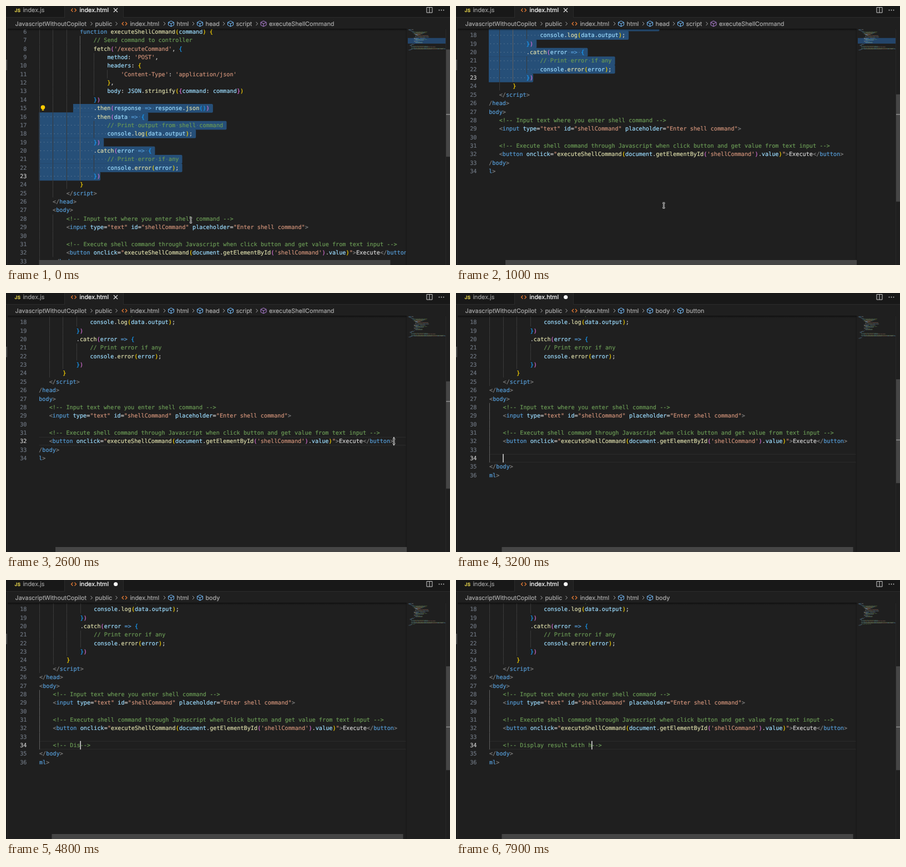
An HTML page with a canvas that plays this animation: 800x468 px, repeating every 8 s.

```html
<!DOCTYPE html>
<html lang="en">
<head>
<meta charset="utf-8">
<style>
  html, body { margin: 0; width: 100%; height: 100%; overflow: hidden; background: #1f1f1f; }
  canvas { display: block; }
</style>
</head>
<body>
<canvas id="stage" width="800" height="468"></canvas>
<script>
const ctx = document.getElementById('stage').getContext('2d');
const LOOP = 8000, LINE = 15.36, CHAR = 6.145, LEFT = 59.5, TOP = 42, VIEW = 425, RIGHT = 722;
const MONO = '10.2px "DejaVu Sans Mono", monospace';
const UI = '10.8px Inter, sans-serif';
const CLICK = 2600, REFRESH = 2700, ENTER = [2900, 3000];
const COLOR = {
  bg: '#1f1f1f', bar: '#181818', border: '#2b2b2b', text: '#d4d4d4', keyword: '#569cd6',
  call: '#dcdcaa', name: '#9cdcfe', string: '#ce9178', comment: '#6a9955', punct: '#808080',
  error: '#f44747', select: '#264f78', slider: '#454545', orange: '#e37933'
};
const BRACKETS = ['#ffd700', '#da70d6', '#179fff'];

const SOURCE = `<!DOCTYPE html>
<html>
    <head>
        <script>
            // Execute shell command through Javascript
            function executeShellCommand(command) {
                // Send command to controller
                fetch('/executeCommand', {
                    method: 'POST',
                    headers: {
                        'Content-Type': 'application/json'
                    },
                    body: JSON.stringify({command: command})
                })
                .then(response => response.json())
                .then(data => {
                    // Print output from shell command
                    console.log(data.output);
                })
                .catch(error => {
                    // Print error if any
                    console.error(error);
                })
            }
        <\/script>
    </head>
    <body>
        <!-- Input text where you enter shell command -->
        <input type="text" id="shellCommand" placeholder="Enter shell command">

        <!-- Execute shell command through Javascript when click button and get value from text input -->
        <button onclick="executeShellCommand(document.getElementById('shellCommand').value)">Execute</button>
    </body>
</html>`.split('\n');

// Typing: one time per character of DRAFT
const DRAFT = '<!-- Display result with h';
const KEY_TIMES = [3400, 3800, 4000, 4100, 4300,
  ...Array.from({ length: 14 }, (_, i) => 4600 + 100 * i),
  6100, 6400, 6500, 6600, 6800, 7300, 7900];
const AUTO_CLOSE = 4200;

// Keyframes: [time, ...values]
const SCROLL = [[0, 80.1, 0], [100, 128, 0], [200, 222, 0], [300, 284, 0], [400, 286, 3], [600, 266, 20], [800, 258, 31]];
const MOUSE = [[900, 333, 387], [1200, 457, 307], [1800, 651, 264], [2000, 680, 265], [2200, 680, 265], [2500, 699, 268]];

function sample(keys, t) {
  if (t <= keys[0][0]) return keys[0].slice(1);
  const next = keys.findIndex(k => k[0] > t);
  if (next < 0) return keys[keys.length - 1].slice(1);
  const a = keys[next - 1], b = keys[next], u = (t - a[0]) / (b[0] - a[0]);
  return a.slice(1).map((v, i) => v + (b[i + 1] - v) * u);
}

function rect(x, y, w, h, color) { ctx.fillStyle = color; ctx.fillRect(x, y, w, h); }

// A hairline stroke gives the text a slightly heavier weight
function text(str, x, y, color, font = UI, align = 'left') {
  ctx.font = font;
  ctx.fillStyle = ctx.strokeStyle = color;
  ctx.lineWidth = 0.2;
  ctx.textAlign = align;
  ctx.fillText(str, x, y);
  ctx.strokeText(str, x, y);
}

function path(points, color, width = 1, close = false) {
  ctx.beginPath();
  points.forEach(([x, y]) => ctx.lineTo(x, y));
  if (close) ctx.closePath();
  ctx.strokeStyle = color;
  ctx.lineWidth = width;
  ctx.stroke();
}

function disc(x, y, r, color) {
  ctx.beginPath();
  ctx.arc(x, y, r, 0, 7);
  ctx.fillStyle = color;
  ctx.fill();
}

// Returns, for each line, its words as {col, str, color}
function highlight(lines, openComment) {
  let depth = 0, words, col;
  const push = (str, color) => {
    for (const m of str.matchAll(/\S+/g)) words.push({ col: col + m.index, str: m[0], color });
    col += str.length;
  };
  const script = code => {
    const rule = /(\/\/.*)|('[^']*')|(function\b|=>)|(\w+)(?=\()|([({])|([)}])|(\w+)|[^]/g;
    for (const [s, comment, string, keyword, call, open, shut, name] of code.matchAll(rule)) {
      if (open) push(s, BRACKETS[depth++ % 3]);
      else if (shut) push(s, BRACKETS[--depth % 3]);
      else push(s, comment ? COLOR.comment : string ? COLOR.string : keyword ? COLOR.keyword
        : call ? COLOR.call : name ? COLOR.name : COLOR.text);
    }
  };
  const markup = code => {
    const rule = /(<[!\/]?)(\w+)|(>)|(\w+)=("[^"]*")|[^<>\s]+|\s+/g;
    for (const [s, open, tag, end, attr, value] of code.matchAll(rule)) {
      if (open) { push(open, COLOR.punct); push(tag, COLOR.keyword); }
      else if (attr) {
        push(attr, COLOR.name);
        push('=', COLOR.text);
        if (attr === 'onclick') {
          push('"', COLOR.string);
          script(value.slice(1, -1));
          push('"', COLOR.string);
        } else push(value, COLOR.string);
      } else push(s, end ? COLOR.punct : COLOR.text);
    }
  };
  return lines.map((line, i) => {
    words = [];
    col = 0;
    const code = line.trim();
    if (code.startsWith('<!--') || (openComment && i > 33)) push(line, COLOR.comment);
    else if (/^<!?-?$/.test(code)) push(line, COLOR.error);
    else if (code[0] === '<') markup(line);
    else script(line);
    return words;
  });
}

function stateAt(t) {
  const lines = SOURCE.slice();
  const count = KEY_TIMES.filter(k => k <= t).length;
  const added = ENTER.filter(k => k <= t).length;
  const draft = ' '.repeat(8) + DRAFT.slice(0, count);
  if (added === 2) lines.splice(32, 0, '', draft + (t >= AUTO_CLOSE ? '-->' : ''));
  else if (added) lines.splice(32, 0, ' '.repeat(8));
  const [top, left] = sample(SCROLL, t);
  return {
    t, lines, top, left: added ? 24.1 : left, edited: added > 0, selecting: t < CLICK,
    words: highlight(lines, t >= 4100 && t < AUTO_CLOSE),
    row: t < CLICK ? 23 : 32 + added,
    caret: t < CLICK ? 18 : added ? draft.length : SOURCE[31].length
  };
}

function drawEditor(s) {
  const rowY = n => TOP + (n - 1) * LINE - s.top;
  const colX = c => LEFT + c * CHAR - s.left;
  const indent = line => line.trim() ? line.search(/\S/) : 8;
  const shown = n => rowY(n) > TOP - LINE && rowY(n) < 468;

  ctx.save();
  ctx.beginPath();
  ctx.rect(3, TOP - 0.5, RIGHT - 3, 468);
  ctx.clip();
  s.lines.forEach((_, i) => {
    const active = i + 1 === s.row;
    if (shown(i + 1)) text(i + 1, 37.5, rowY(i + 1) + 11.2, active ? '#cccccc' : '#6e7681', MONO, 'right');
  });

  ctx.beginPath();
  ctx.rect(LEFT - 0.5, TOP - 0.5, RIGHT - LEFT, 468);
  ctx.clip();
  if (!s.selecting) {
    rect(LEFT, rowY(s.row), RIGHT, 1, '#2c2c2c');
    rect(LEFT, rowY(s.row) + LINE - 1, RIGHT, 1, '#2c2c2c');
  }

  s.lines.forEach((line, i) => {
    const n = i + 1, y = rowY(n);
    if (!shown(n)) return;
    if (s.selecting && n >= 15 && n <= 23) {
      const from = n === 15 ? 10 : 0, x = colX(from);
      ctx.beginPath();
      ctx.roundRect(x, y, colX(line.length) + (n < 23 ? CHAR : 0) - x, LINE + 0.4, [0, 2, 2, 0]);
      ctx.fillStyle = COLOR.select;
      ctx.fill();
      for (let c = from; c < line.length; c++)
        if (line[c] === ' ') rect(colX(c) + 2.5, y + 7.2, 1.1, 1.1, 'rgba(227,228,226,0.35)');
    }
    for (let c = 0; c < indent(line); c += 4) {
      const active = s.selecting ? c === 12 && n > 6 && n < 24 : c === 4 && n > 27;
      rect(Math.round(colX(c)), y, 1, LINE, active ? '#606060' : '#3a3a3a');
    }
    for (const w of s.words[i]) text(w.str, colX(w.col), y + 11.2, w.color, MONO);
  });

  if (s.selecting) {
    const y = rowY(15) + 6;
    disc(66.5, y, 3.8, '#ffcc00');
    rect(64.8, y + 3, 3.4, 3, '#ffcc00');
    rect(64.8, y + 4.2, 3.4, 0.7, '#5a4a10');
  }
  const blinkOn = s.t >= CLICK || (s.t + 900) % 1000 < 500;
  if (blinkOn) rect(colX(s.caret) - 0.3, rowY(s.row), 1.6, LINE, '#d0d0d0');
  if (s.t >= 3500 && s.t < 3800) drawSuggestions(colX(9), rowY(s.row + 1));
  ctx.restore();
}

function drawSuggestions(x, y) {
  rect(x, y, 367, 190, '#454545');
  rect(x + 1, y + 1, 365, 188, '#202020');
  rect(x + 1, y + 1, 365, LINE, '#04395e');
  '/body a abbr address area article aside audio b base bdi'.split(' ').forEach((tag, i) => {
    const rowTop = y + 1 + i * LINE;
    path([[x + 6, rowTop + 11], [x + 13, rowTop + 4]], '#cccccc', 1.5);
    text(tag, x + 20, rowTop + 11.2, COLOR.text, MONO);
  });
}

function drawMinimap(s) {
  rect(RIGHT - 1.5, TOP, 1.5, 426, '#191919');
  const pitch = 1.13;
  if (s.selecting) rect(724, TOP + 14 * pitch, 68, 9 * pitch, '#24456a');
  ctx.globalAlpha = 0.5;
  s.words.forEach((words, i) => {
    for (const w of words) rect(725 + w.col * 0.62, TOP + i * pitch, w.str.length * 0.62, 0.8, w.color);
  });
  ctx.globalAlpha = 1;
}

function drawScrollbars(s) {
  const ratio = VIEW / ((s.lines.length - 1) * LINE + VIEW);
  rect(792, TOP, 1, 426, '#282828');
  rect(793, TOP + s.top * ratio, 7, VIEW * ratio, COLOR.slider);
  const markRow = s.t < REFRESH ? 23 : s.row;
  rect(793, TOP + (markRow - 1) * LINE * ratio - 1, 7, 1.6, '#8a8a8a');
  rect(LEFT + s.left * 0.955, 459, 633, 9, COLOR.slider);
}

function angles(x, y) {
  path([[x - 1.5, y - 3], [x - 4.5, y], [x - 1.5, y + 3]], COLOR.orange, 1.3);
  path([[x + 1.5, y - 3], [x + 4.5, y], [x + 1.5, y + 3]], COLOR.orange, 1.3);
}

function cube(x, y, color) {
  path([[x, y - 5], [x + 5, y - 2.5], [x + 5, y + 2.5], [x, y + 5], [x - 5, y + 2.5], [x - 5, y - 2.5]], color, 1, true);
  path([[x - 5, y - 2.5], [x, y], [x + 5, y - 2.5]], color);
  path([[x, y], [x, y + 5]], color);
}

function drawHeader(s) {
  rect(0, 0, 800, TOP - 0.5, COLOR.bg);
  rect(0, 0, 105, 20, COLOR.bar);
  rect(212, 0, 588, 20, COLOR.bar);
  rect(0, 20, 106, 1, COLOR.border);
  rect(211, 20, 589, 1, COLOR.border);
  rect(105, 0, 1, 21, COLOR.border);
  rect(211, 0, 1, 21, COLOR.border);
  text('JS', 15.5, 10.7, '#d7c64a', 'bold 8.5px Inter, sans-serif');
  text('index.js', 30.5, 11.2, '#9d9d9d');
  angles(122, 7.5);
  text('index.html', 132.5, 11.2, '#ffffff');
  if (s.edited) disc(197.7, 7.5, 3.6, '#ffffff');
  else {
    path([[194, 4], [201, 11]], '#e0e0e0', 1.2);
    path([[201, 4], [194, 11]], '#e0e0e0', 1.2);
  }
  path([[758, 2.5], [768, 2.5], [768, 12], [758, 12]], '#cccccc', 1, true);
  path([[763, 2.5], [763, 12]], '#cccccc');
  for (const x of [780.5, 784.5, 788.5]) disc(x, 7.5, 0.9, '#cccccc');

  const crumb = (label, x) => text(label, x, 35.7, '#a9a9a9');
  const chevron = x => path([[x - 1.5, 28.8], [x + 1.5, 32], [x - 1.5, 35.2]], '#a9a9a9');
  const symbol = (label, x, color = '#75beff') => {
    chevron(x - 22);
    cube(x - 10, 32, color);
    crumb(label, x);
  };
  crumb('JavascriptWithoutCopilot', 16.5);
  chevron(154);
  crumb('public', 160.5);
  chevron(199);
  angles(213.5, 32);
  crumb('index.html', 223.5);
  symbol('html', 307.5);
  if (s.t < REFRESH) {
    symbol('head', 359.5);
    symbol('script', 414.5);
    symbol('executeShellCommand', 474, '#b180d7');
  } else {
    symbol('body', 359.5);
    if (s.t < 4600) symbol('button', 414.5);
  }
  const shade = ctx.createLinearGradient(0, 41, 0, 45);
  shade.addColorStop(0, 'rgba(0,0,0,0.5)');
  shade.addColorStop(1, 'rgba(0,0,0,0)');
  rect(3, 41, RIGHT - 3, 4, shade);
}

function drawMouse(t) {
  if (t >= ENTER[0]) return;
  const [x, y] = sample(MOUSE, t);
  for (const [color, width] of [['#d8d8d8', 2.6], ['#222222', 0.9]]) {
    path([[x - 2, y - 5], [x, y - 4], [x + 2, y - 5]], color, width);
    path([[x, y - 4], [x, y + 4]], color, width);
    path([[x - 2, y + 5], [x, y + 4], [x + 2, y + 5]], color, width);
  }
}

function draw(now) {
  const s = stateAt(Math.floor((now % LOOP) / 100) * 100);
  ctx.textRendering = 'geometricPrecision';
  ctx.lineJoin = 'round';
  rect(0, 0, 800, 468, COLOR.bg);
  drawEditor(s);
  drawMinimap(s);
  drawScrollbars(s);
  drawHeader(s);
  rect(0, 21, 2, 447, COLOR.bar);
  rect(2, 21, 1, 447, COLOR.border);
  rect(0, 97, 2, 19, '#4a4a4a');
  drawMouse(s.t);
}

const start = performance.now();
function tick() {
  draw(performance.now() - start);
  requestAnimationFrame(tick);
}
tick();
</script>
</body>
</html>
```
